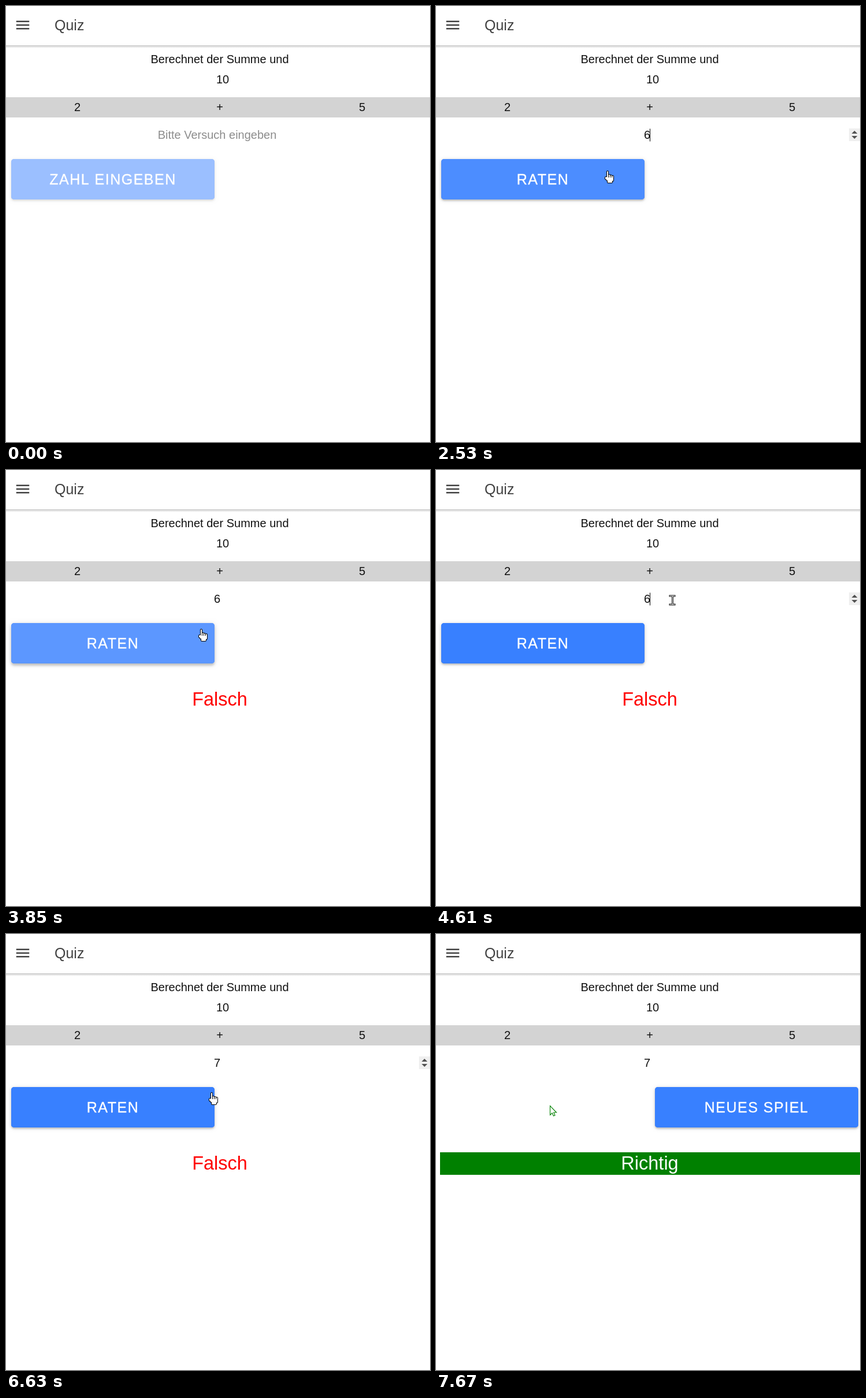
Animation of 734 by 755 pixels, one loop 8000 ms. Source, as an HTML page with a canvas:

```html
<!DOCTYPE html>
<html lang="de">
<head>
<meta charset="utf-8">
<title>Quiz</title>
<style>
  html, body { margin: 0; width: 100%; height: 100%; overflow: hidden; background: #fff; }
  canvas { display: block; }
</style>
</head>
<body>
<canvas id="stage" width="734" height="755"></canvas>
<script>
const ctx = document.getElementById('stage').getContext('2d');
const LOOP = 8000, BLINK = 545, HOVER_LAG = 20;
const INK = '#111', GRAY = '#424242', GREEN = '#008000';
const BLUE = '#3880ff', HOVER = '#4c8dff', FOCUSED = '#5c97ff', PALE = '#9bbfff';

const ENTER = 290, JUDGED = 3450, SOLVED = 7670;
const edits = [
  { at: 910, value: '' }, { at: 2230, value: '6' }, { at: 4470, value: '6' },
  { at: 5470, value: '' }, { at: 5930, value: '7' }
];
const presses = [{ from: 910, to: 1060 }, { from: 3220, to: 3310 }, { from: 4370, to: 4610 }, { from: 7470, to: SOLVED }];
const focus = [{ from: 910, to: 3220 }, { from: 4370, to: 7470 }];
const moves = [
  { from: ENTER, to: 680, x: 415, y: 227 },
  { from: 2470, to: 2530, x: 297, y: 285 },
  { from: 2610, to: 3070, x: 182, y: 285, sag: 42 },
  { from: JUDGED, to: 3850, x: 338, y: 275 },
  { from: 3910, to: 4220, x: 409, y: 226 },
  { from: 6560, to: 6630, x: 356, y: 274 },
  { from: 6710, to: 7170, x: 197, y: 297, sag: 38 }
];

const during = (t, spans) => spans.some(s => t >= s.from && t < s.to);

function pointerAt(t) {
  if (t < ENTER) return null;
  let x = 500, y = 500;
  for (const m of moves) {
    const u = Math.min(Math.max((t - m.from) / (m.to - m.from), 0), 1);
    x += (m.x - x) * u;
    y += (m.y - y) * u + (m.sag || 0) * Math.sin(Math.PI * u);
  }
  return { x: Math.round(x), y: Math.round(y) };
}

const inInput = p => !!p && p.y > 205 && p.y < 245;
const inButton = p => !!p && p.x >= 9 && p.x < 361 && p.y >= 265 && p.y < 335;

function rect(x, y, w, h, color) {
  ctx.fillStyle = color;
  ctx.fillRect(x, y, w, h);
}

function blob(x, y, w, h, r, color) {
  ctx.fillStyle = color;
  ctx.beginPath();
  ctx.roundRect(x, y, w, h, r);
  ctx.fill();
}

function text(str, x, y, size = 20, color = INK, align = 'center', spacing = 0) {
  ctx.font = `${size}px "Liberation Sans", Arial, sans-serif`;
  ctx.letterSpacing = spacing + 'px';
  ctx.textAlign = align;
  ctx.fillStyle = color;
  ctx.fillText(str, x, y);
}

function polygon(points, color) {
  ctx.beginPath();
  points.forEach(([x, y]) => ctx.lineTo(x, y));
  ctx.closePath();
  ctx.fillStyle = color;
  ctx.fill();
}

function button(x, label, color, lift = 1) {
  ctx.save();
  for (const drop of [1, 2.5]) {
    ctx.shadowColor = `rgba(0,0,0,${0.16 * Math.min(lift, 1)})`;
    ctx.shadowOffsetY = drop * Math.max(lift, 1);
    ctx.shadowBlur = (drop === 1 ? 6 : 2.5) * Math.max(lift, 1);
    blob(x, 265, 352, 70, 5, color);
  }
  ctx.restore();
  text(label, x + 176, 309, 25, '#fff', 'center', 1.5);
  ctx.strokeStyle = '#fff';
  ctx.lineWidth = 0.35;
  ctx.strokeText(label, x + 176, 309);
}

function header() {
  const shade = ctx.createLinearGradient(0, 68, 0, 73);
  shade.addColorStop(0, 'rgba(0,0,0,.22)');
  shade.addColorStop(1, 'rgba(0,0,0,0)');
  rect(0, 68, 734, 5, shade);
  for (let i = 0; i < 3; i++) rect(17.75, 25.5 + i * 6.25, 22.5, 2.5, GRAY);
  text('Quiz', 84, 42, 25, GRAY, 'left');
}

function task() {
  text('Berechnet der Summe und', 370, 99);
  text('10', 375, 134);
  rect(0, 158, 734, 35, '#d3d3d3');
  ['2', '+', '5'].forEach((s, i) => text(s, 123.5 + i * 246.5, 182));
}

function spinner() {
  rect(715, 212, 19, 22, '#efefef');
  for (const side of [-1, 1]) {
    const y = 223 + side * 2;
    polygon([[719.5, y], [724.5, y + side * 5], [729.5, y]], '#505050');
  }
}

function input(t, edit, hover) {
  const focused = during(t, focus);
  if (edit.value) text(edit.value, 365.5, 230);
  else text('Bitte Versuch eingeben', 365.5, 230, 20, '#8c8c8c');
  if (focused || hover) spinner();
  const caretOn = Math.floor((t - edit.at) / BLINK) % 2 === 0;
  if (focused && caretOn) rect(edit.value ? 370 : 366, 212.5, 1, 22, '#000');
}

function guessButton(t, value) {
  if (!value) return button(9, 'ZAHL EINGEBEN', PALE, 0.5);
  const hover = inButton(pointerAt(t - HOVER_LAG));
  const pressed = hover && t >= JUDGED && !during(t, focus);
  button(9, 'RATEN', pressed ? FOCUSED : hover ? HOVER : BLUE, pressed ? 1.5 : 1);
}

// Each cursor is a dark shape with a smaller white one on top
const cursors = {
  arrow(edge) {
    const shape = [[.5, .5], [.5, 16.5], [4, 13], [6.5, 18], [9, 17], [6.7, 12], [11.5, 12]];
    polygon(shape, '#fff');
    ctx.strokeStyle = edge;
    ctx.lineWidth = 1.1;
    ctx.stroke();
  },
  hand() {
    for (const [grow, color] of [[1, '#000'], [0, '#fff']]) {
      const part = (x, y, w, h) => blob(x - grow, y - grow, w + 2 * grow, h + 2 * grow, 1 + grow, color);
      for (let i = 0; i < 4; i++) part(-1 + i * 3, i ? 6 + i : 1, 2, 12 - i);
      part(-4, 11, 3, 4);
      part(-2, 12, 12, 5);
      part(0, 14, 8, 7);
    }
  },
  beam() {
    for (const [w, color] of [[3, '#111'], [1, '#fff']]) {
      for (const y of [-8, 7]) rect(-4 - w / 2, y - w / 2, 8 + w, w, color);
      rect(.5 - w / 2, -8, w, 15, color);
    }
  }
};

function pointer(t, p, kind, edge) {
  ctx.save();
  ctx.translate(p.x, p.y);
  if (during(t, presses)) blob(-15, -15, 30, 30, 15, 'rgba(255,255,0,.47)');
  cursors[kind](edge);
  ctx.restore();
}

function draw(t) {
  const edit = edits.findLast(e => e.at <= t) || edits[0];
  const solved = t >= SOLVED;
  const p = pointerAt(t);

  rect(0, 0, 734, 755, '#fff');
  header();
  task();
  input(t, edit, inInput(p));
  if (solved) {
    button(379, 'NEUES SPIEL', BLUE);
    rect(7, 378, 727, 39, GREEN);
    text('Richtig', 370, 408, 32.5, '#fff');
  } else {
    guessButton(t, edit.value);
    if (t >= JUDGED) text('Falsch', 370, 408, 32.5, '#f00');
  }
  if (!p) return;
  const clickable = inButton(p) && edit.value && !solved;
  pointer(t, p, inInput(p) ? 'beam' : clickable ? 'hand' : 'arrow', solved ? GREEN : '#000');
}

const start = performance.now();
function frame() {
  draw((performance.now() - start) % LOOP);
  requestAnimationFrame(frame);
}
frame();
</script>
</body>
</html>
```
